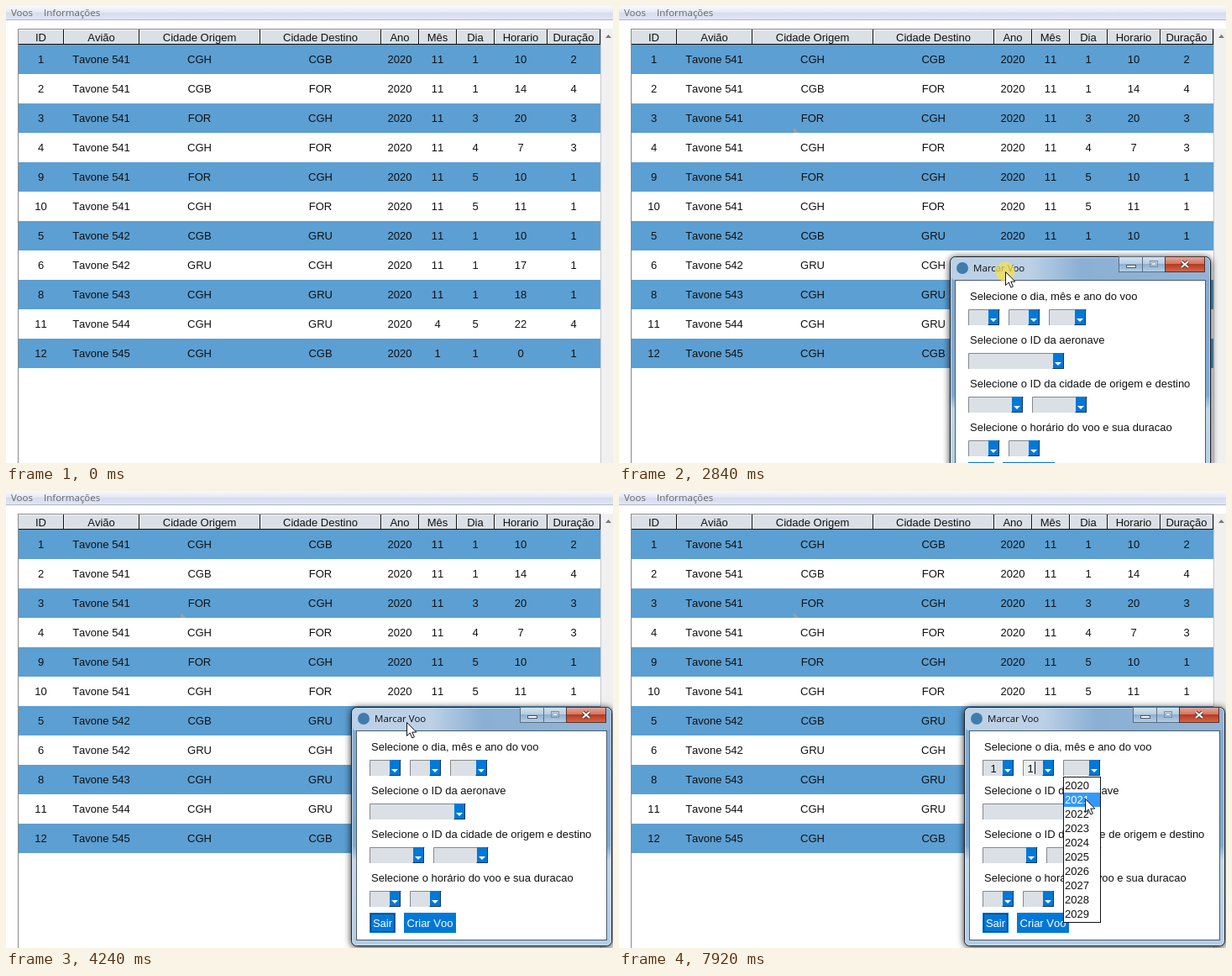
Write an HTML page that moves like this. It is 723 by 544 pixels and loops after 8 s.

```html
<!DOCTYPE html>
<html lang="pt">
<head>
<meta charset="utf-8">
<title>Voos</title>
<style>
html, body { margin: 0; width: 100%; height: 100%; overflow: hidden; background: #fff; }
svg { display: block; width: 723px; height: 544px; }
text { font: 13px "Liberation Sans", Arial, sans-serif; font-kerning: none; fill: #111; white-space: pre; }
.ui { font: 11.5px "Open Sans", "Noto Sans", sans-serif; }
.mid { text-anchor: middle; }
.window { filter: drop-shadow(0 1px 4px rgba(0, 0, 0, .85)); }
</style>
</head>
<body>
<svg viewBox="0 0 723 544">
  <defs>
    <linearGradient id="bar" x2="0" y2="1">
      <stop stop-color="#f7f9fd"/><stop offset=".45" stop-color="#e6eaf5"/>
      <stop offset=".5" stop-color="#d6dced"/><stop offset="1" stop-color="#dfe5f3"/>
    </linearGradient>
    <linearGradient id="glass" x2="0" y2="1">
      <stop stop-color="#86acd2"/><stop offset=".58" stop-color="#7fa9d1"/>
      <stop offset=".64" stop-color="#c3d7e9"/><stop offset="1" stop-color="#b2cde6"/>
    </linearGradient>
    <linearGradient id="shine">
      <stop stop-color="#fff" stop-opacity=".45"/><stop offset=".3" stop-color="#fff" stop-opacity=".45"/>
      <stop offset=".5" stop-color="#fff" stop-opacity=".05"/><stop offset="1" stop-color="#fff" stop-opacity=".1"/>
    </linearGradient>
    <linearGradient id="caption" x2="0" y2="1">
      <stop stop-color="#d5e3f1"/><stop offset=".48" stop-color="#b5cce2"/>
      <stop offset=".5" stop-color="#8fafce"/><stop offset="1" stop-color="#b4d0e8"/>
    </linearGradient>
    <linearGradient id="close" x2="0" y2="1">
      <stop stop-color="#e5a79a"/><stop offset=".48" stop-color="#d17462"/>
      <stop offset=".5" stop-color="#b83a22"/><stop offset="1" stop-color="#d2694a"/>
    </linearGradient>
  </defs>
  <g id="page"></g>
  <g id="live"></g>
</svg>
<script>
const LOOP = 8000;
const FIELD = '#dae0e6', BLUE = '#0078d7', ROW = '#5c9fd2';

const rect = (x, y, w, h, fill, extra = '') =>
  `<rect x="${x}" y="${y}" width="${w}" height="${h}" fill="${fill}" ${extra}/>`;
const path = (d, fill, extra = '') => `<path d="${d}" fill="${fill}" ${extra}/>`;
const text = (x, y, s, extra = '') => `<text x="${x}" y="${y}" ${extra}>${s}</text>`;

function page() {
  const edges = [14, 68, 158, 302, 446, 491, 536, 581, 644, 707];
  const heads = ['ID', 'Avião', 'Cidade Origem', 'Cidade Destino', 'Ano', 'Mês', 'Dia', 'Horario', 'Duração'];
  const flights = `1 541 CGH CGB 2020 11 1 10 2
2 541 CGB FOR 2020 11 1 14 4
3 541 FOR CGH 2020 11 3 20 3
4 541 CGH FOR 2020 11 4 7 3
9 541 FOR CGH 2020 11 5 10 1
10 541 CGH FOR 2020 11 5 11 1
5 542 CGB GRU 2020 11 1 10 1
6 542 GRU CGH 2020 11 1 17 1
8 543 CGH GRU 2020 11 1 18 1
11 544 CGH GRU 2020 4 5 22 4
12 545 CGH CGB 2020 1 1 0 1`.split('\n').map(line => line.split(' '));
  const center = i => (edges[i] + edges[i + 1] + 1) / 2;

  let out = rect(0, 0, 723, 16, 'url(#bar)') + rect(0, 16, 723, 1, '#b3b7c4')
    + text(6, 12, 'Voos', 'class="ui" style="fill:#666"')
    + text(45, 12, 'Informações', 'class="ui" style="fill:#666"')
    + rect(709, 27, 14, 517, '#f0f0f0') + path('M714 38l3.5-4 3.5 4z', '#777')
    + rect(14, 27, 695, 1, '#8a8a8a') + rect(14, 27, 1, 517, '#8a8a8a') + rect(708, 27, 1, 517, '#c8c8c8')
    + rect(15, 28, 693, 18, FIELD) + rect(15, 28, 693, 1, '#f2f5f8') + rect(15, 45, 693, 1, '#111');
  heads.forEach((head, i) => {
    out += text(center(i), 42, head, 'class="mid"') + rect(edges[i + 1], 28, 1, 18, '#111');
    if (i) out += rect(edges[i] + 1, 28, 1, 17, '#f2f5f8');
  });
  flights.forEach((cells, r) => {
    const y = 46 + r * 35;
    if (r % 2 === 0) out += rect(15, y, 693, 35, ROW);
    cells.forEach((cell, i) => {
      out += text(center(i), y + 22, i === 1 ? 'Tavone ' + cell : cell, 'class="mid"');
    });
  });
  return out;
}

function combo(x, y, w, { value = '', hot, focus } = {}) {
  const bx = x + w - 13;
  let out = rect(x, y, w, 19, FIELD) + path(`M${x + .5} ${y + 19}v-18.5h${w}`, 'none', 'stroke="#85898d"');
  if (focus === 'box') out += rect(x + 2.5, y + 1.5, 16, 16, '#e6e8ea', 'stroke="#8d9195"') + rect(x + 18, y + 2, 1, 16, '#222');
  if (focus === 'caret') out += rect(x + 1, y + 1, 14, 17, '#eceff1') + rect(x + 14, y + 2, 1, 15, '#111');
  return out + text(x + (focus === 'caret' ? 5.5 : 9.5), y + 14.5, value)
    + rect(bx, y, 13, 19, hot ? '#dce4ec' : BLUE)
    + path(`M${bx + 12.5} ${y}v18.5h-13`, 'none', 'stroke="#17344e"')
    + path(`M${bx + 2} ${y + 11}h8l-4 4z`, hot ? BLUE : '#fff');
}

function button(x, w, label, focused) {
  return rect(x, 245, w, 24, BLUE)
    + (focused ? rect(x + 1.5, 246.5, w - 3, 21, 'none', 'stroke="#111" stroke-dasharray="1 1"') : '')
    + text(x + w / 2, 262, label, 'class="mid" style="fill:#fff"');
}

function dialog(s) {
  const labels = ['dia, mês e ano do voo', 'ID da aeronave', 'ID da cidade de origem e destino', 'horário do voo e sua duracao'];
  let out = rect(.5, .5, 310, 284, 'url(#glass)', 'rx="6" stroke="#1c242c"')
    + rect(1.5, 1.5, 308, 282, 'none', 'rx="5" stroke="#e4eff8" stroke-opacity=".6"')
    + rect(2, 2, 307, 26, 'url(#shine)', 'rx="4"')
    + '<circle cx="15" cy="14" r="7" fill="#3f7cae"/>'
    + text(28, 18, 'Marcar Voo', 'class="ui"')
    + rect(201.5, .5, 28, 18, 'url(#caption)', 'stroke="#5a6d80"')
    + rect(229.5, .5, 27, 18, 'url(#caption)', 'stroke="#5a6d80"')
    + rect(256.5, .5, 47, 18, 'url(#close)', 'stroke="#59302b"')
    + rect(210.5, 10.5, 11, 3, '#fff', 'stroke="#4b5563"')
    + rect(238.5, 5.5, 9, 7, 'none', 'stroke="#7c8fa3"') + rect(240.5, 7.5, 5, 3, '#dce8f3', 'stroke="#9cb0c4"')
    + path('M276 6l8 7m0-7l-8 7', 'none', 'stroke="#53302c" stroke-width="4"')
    + path('M276 6l8 7m0-7l-8 7', 'none', 'stroke="#fff" stroke-width="2.2"')
    + rect(6.5, 28.5, 298, 249, '#fff', 'stroke="#4a5b6c"');
  labels.forEach((label, i) => out += text(24, 52 + 52 * i, 'Selecione o ' + label));
  return out
    + combo(22, 63, 37, { value: s.day, hot: s.hot === 'day', focus: s.day && !s.month && 'box' })
    + combo(70, 63, 37, { value: s.month, hot: s.hot === 'month', focus: s.month && 'caret' })
    + combo(118, 63, 44, { hot: s.hot === 'year' })
    + combo(22, 115, 114) + combo(22, 167, 65) + combo(98, 167, 65)
    + combo(22, 219, 37) + combo(70, 219, 37)
    + button(22, 31, 'Sair', true) + button(63, 62, 'Criar Voo');
}

function list(x, w, first, picked, scrolls) {
  let out = rect(x + .5, 340.5, w - 1, 173, '#fff', 'stroke="#111"');
  for (let i = 0; i < 10; i++) {
    const y = 342 + 17 * i, on = i === picked;
    if (on) out += rect(x + 1, y, w - 2, 17, '#3399ff');
    out += text(x + 2, y + 13, first + i, on ? 'style="fill:#fff"' : '');
  }
  if (scrolls) out += rect(x + w - 17, 341, 16, 172, '#f0f0f0')
    + rect(x + w - 16.5, 357.5, 14, 60, '#dadada', 'stroke="#a0a0a0"')
    + path(`M${x + w - 13} 351l4-4 4 4z`, '#666') + path(`M${x + w - 13} 503l4 4 4-4z`, '#666');
  return out;
}

const lists = {
  day: row => list(433, 38, 1, row, true),
  month: row => list(481, 38, 1, row, true),
  year: row => list(529, 45, 2020, row, false)
};

function menu() {
  return rect(.5, 16.5, 145, 24, '#f3f3f3', 'stroke="#979797"')
    + rect(3.5, 18.5, 139, 19, '#dcebf8', 'rx="2" stroke="#aecff7"')
    + text(32, 32, 'Marcar Voo', 'class="ui"');
}

const cursor = (x, y, press) =>
  (press ? `<circle cx="${x}" cy="${y}" r="11.5" fill="#f4e04d" fill-opacity=".75"/>` : '')
  + path('M.5 .5v16l3.7-3.5 2.6 6 2.6-1.1-2.6-5.8h5z', '#fff', `stroke="#111" transform="translate(${x} ${y})"`);

// time, pointer x, y, then flags
const steps = [
  [0, -40, -40],
  [200, 652, 522], [400, 560, 430], [600, 430, 320], [800, 305, 218], [1000, 208, 145], [1200, 48, 22],
  [1420, 26, 8], [1620, 24, 9, { press: 1, menu: 1 }], [1820, 58, 27, { menu: 1 }],
  [2020, 66, 28, { press: 1, menu: 1 }], [2240, 194, 157], [2440, 343, 248], [2620, 438, 304],
  [2820, 460, 316, { press: 1 }], [3040, 463, 305, { press: 1 }], [3260, 468, 293, { press: 1 }],
  [3440, 471, 286, { press: 1 }], [3640, 473, 281, { press: 1 }], [3860, 477, 275, { press: 1 }],
  [4240, 477, 275], [4460, 472, 300], [4640, 463, 328, { hot: 'day' }],
  [4840, 463, 328, { hot: 'day', press: 1 }], [5060, 460, 338, { open: 'day' }],
  [5260, 446, 350, { open: 'day', row: 0 }],
  [5460, 480, 340], [5660, 509, 326, { hot: 'month' }], [5880, 510, 328, { hot: 'month', press: 1 }],
  [6080, 508, 338, { open: 'month' }], [6280, 494, 350, { open: 'month', row: 0 }],
  [6480, 532, 338], [6680, 562, 329, { hot: 'year' }], [6880, 566, 328, { hot: 'year', press: 1 }],
  [7080, 566, 329, { open: 'year' }], [7300, 562, 339, { open: 'year' }],
  [7500, 557, 348, { open: 'year', row: 0 }], [7700, 555, 351, { open: 'year', row: 0 }],
  [7920, 555, 366, { open: 'year', row: 1 }]
];

function scene([t, x, y, s = {}]) {
  let out = '';
  if (t >= 1000) out += path('M208 145l7 6h-7z', '#9a9fa3');
  if (s.menu) out += menu();
  if (t === 2240) out += rect(3, 18, 140, 20, '#cfe3f6', 'opacity=".3"');
  if (t >= 2240) {
    const dragged = t >= 2820 && t <= 3860;
    const [wx, wy] = dragged ? [x - 66, y - 18] : t < 2820 ? [395, 299] : [411, 257];
    const fading = t === 2240 ? ' translate(155.5 142.5) scale(.98 .975) translate(-155.5 -142.5)" opacity=".82' : '';
    const state = { ...s, day: t >= 5460 ? '1' : '', month: t >= 6480 ? '1' : '' };
    out += `<g class="window" transform="translate(${wx} ${wy})${fading}">${dialog(state)}</g>`;
  }
  if (s.open) out += lists[s.open](s.row);
  return out + cursor(x, y, s.press);
}

const live = document.getElementById('live');
document.getElementById('page').innerHTML = page();
const start = performance.now();
let shown;

function tick(now) {
  const t = Math.max(0, now - start) % LOOP;
  const step = steps.findLast(([at]) => at <= t);
  if (step !== shown) {
    shown = step;
    live.innerHTML = scene(step);
  }
  requestAnimationFrame(tick);
}
tick(start);
</script>
</body>
</html>
```
